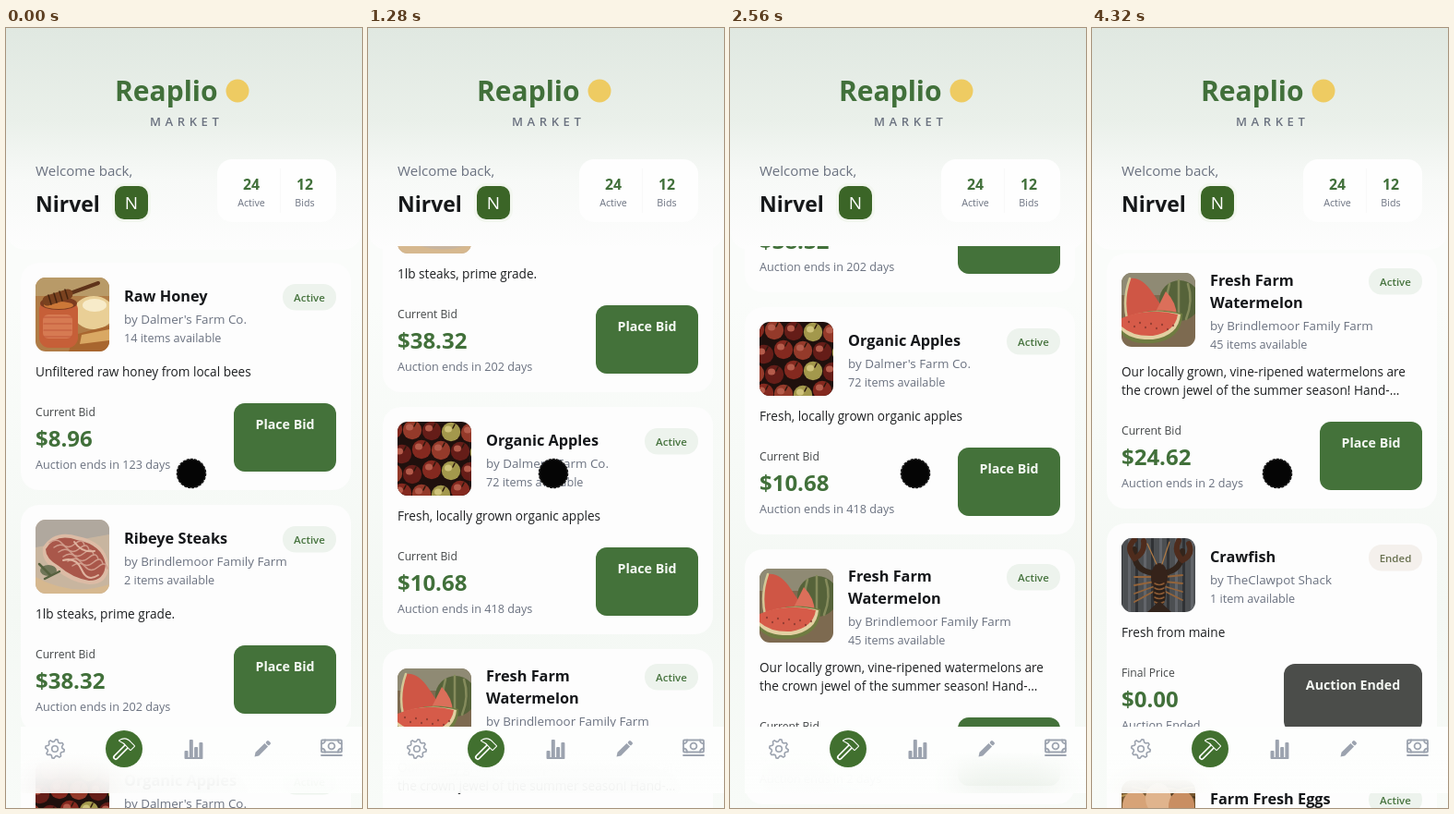
Write an HTML page that moves like this. It is 386 px wide and 844 px high and loops after 4.4 s.

```html
<!DOCTYPE html>
<html lang="en">
<head>
<meta charset="utf-8">
<title>Farm auction list</title>
<style>
  html, body { margin: 0; width: 100%; height: 100%; overflow: hidden; }
  body { position: relative; background: linear-gradient(#fafcfa 35%, #f4f8f4 75%, #f8fbf8); }
  svg { position: absolute; left: 0; top: 0; display: block; }
  text { font-family: "Open Sans", "Noto Sans", sans-serif; fill: #6b7280; }
  .mid { text-anchor: middle; }
  .brand { font-size: 30px; font-weight: 700; fill: #41703a; }
  .market { font-size: 13px; font-weight: 600; letter-spacing: 4.6px; }
  .hello { font-size: 15.1px; }
  .user { font-size: 23px; font-weight: 700; fill: #16181a; }
  .initial { font-size: 19px; fill: #fff; }
  .count { font-size: 15.8px; font-weight: 700; fill: #41703a; }
  .unit { font-size: 10.7px; }
  .title { font-size: 16.3px; font-weight: 700; fill: #15171a; }
  .seller { font-size: 13.4px; }
  .small { font-size: 12.65px; }
  .desc { font-size: 13.62px; fill: #1d1f21; }
  .label { font-size: 12.15px; fill: #454849; }
  .price { font-size: 24px; font-weight: 700; fill: #41703a; }
  .action { font-size: 14.2px; font-weight: 700; fill: #f4f8f3; }
  .badge { font-size: 11.5px; font-weight: 600; fill: #47743f; }
  .ended { fill: #68704f; }
  nav {
    position: absolute; left: 16px; top: 756px; width: 386px; height: 72px;
    background: linear-gradient(#fdfefd 38%, rgba(253, 254, 253, .88));
    backdrop-filter: blur(18px);
  }
</style>
</head>
<body>
<svg id="stage" width="386" height="844" viewBox="0 0 386 844"></svg>
<nav></nav>
<svg id="icons" width="386" height="844" viewBox="0 0 386 844"></svg>
<script>
const LOOP = 4400, STEP = 80, FIRST_TOP = 254, GAP = 16;
const GREEN = '#44723a', GREY = '#9ca3af';

const text = (x, y, str, cls) => `<text x="${x}" y="${y}" class="${cls}">${str}</text>`;
const rect = (x, y, w, h, r, fill, more = '') =>
  `<rect x="${x}" y="${y}" width="${w}" height="${h}" rx="${r}" fill="${fill}" ${more}/>`;
const circle = (x, y, r, fill, more = '') => `<circle cx="${x}" cy="${y}" r="${r}" fill="${fill}" ${more}/>`;
const oval = (x, y, rx, ry, fill) => `<ellipse cx="${x}" cy="${y}" rx="${rx}" ry="${ry}" fill="${fill}"/>`;
const shape = (d, fill) => `<path d="${d}" fill="${fill}"/>`;
const line = (d, color, w) =>
  `<path d="${d}" fill="none" stroke="${color}" stroke-width="${w}" stroke-linecap="round" stroke-linejoin="round"/>`;
const repeat = (n, draw) => Array.from({ length: n }, (_, i) => draw(i)).join('');

// Thumbnails, each 80 x 80
const photo = {
  honey: () => rect(0, 0, 80, 80, 0, '#b07c46') + shape('M0 0H80V20H0Z', '#b89a68') +
    oval(63, 38, 22, 18, '#e9cf96') + oval(64, 30, 13, 7, '#f7ebc9') +
    shape('M42 62L80 52V80H36Z', '#a8662f') + shape('M50 62L80 56V68L48 72Z', '#d9a863') +
    rect(4, 24, 42, 52, 11, '#c65f38') +
    oval(25, 28, 20, 7, '#7c3c20') + oval(25, 30, 16, 4, '#cc7838') +
    rect(8, 40, 32, 26, 6, '#d67a52') + repeat(4, i => line(`M9 ${43 + i * 7}H39`, '#c2583a', 1.2)) +
    line('M24 22L68 6', '#5f331a', 4) + line('M13 25L35 18', '#7a421f', 11) +
    repeat(4, i => line(`M${14 + i * 6} ${19 - i * 2}l3 10`, '#45240f', 1.5)),
  steak: () => rect(0, 0, 80, 80, 0, '#c8b59f') + shape('M0 0H80V16L0 30Z', '#b0a89e') +
    shape('M0 62Q40 84 80 70V80H0Z', '#d6b88f') +
    shape('M8 30Q20 10 46 18Q76 24 79 48Q80 70 58 70Q38 68 22 54Q6 46 8 30Z', '#dcbba5') +
    shape('M11 32Q22 14 45 22Q72 27 76 48Q75 66 58 66Q40 63 25 50Q11 42 11 32Z', '#a9574a') +
    repeat(6, i => line(`M${15 + i * 5} ${25 + i * 5}q8 -6 14 1t14 0t10 2`, '#d09c8b', 1.4)) +
    line('M42 24Q50 36 64 34M30 44Q44 40 50 54T68 60', '#dfb4a0', 2) +
    oval(14, 55, 9, 6, '#6f7558') + line('M4 48l12 12M10 64l16-8', '#56613f', 2.5),
  apples: () => rect(0, 0, 80, 80, 0, '#1f100d') + repeat(20, i => {
    const row = Math.floor(i / 5), x = (i % 5) * 21 - 5 + (row % 2) * 10, y = row * 22 + 8 + (i * 7 % 6);
    const pale = [3, 9, 13, 17].includes(i);
    return circle(x, y, 10.2, pale ? '#a3984c' : ['#84291f', '#943a2a', '#651d18'][i % 3]) +
      oval(x - 3, y - 3, 4, 3.5, pale ? '#cfc37b' : '#b55c4b') + line(`M${x + 2} ${y - 4}l2-4`, '#2c180e', 1.5);
  }),
  melon: () => rect(0, 0, 80, 80, 0, '#7d6a50') + rect(0, 0, 80, 24, 0, '#8f8a74') +
    circle(63, 30, 22, '#56633a') + line('M52 12Q46 30 54 50M62 8V52M72 12Q78 30 70 50', '#858b5c', 2.5) +
    shape('M9 6Q22 4 34 22L50 46L6 50Q2 26 9 6Z', '#cf5645') + line('M9 6Q1 28 6 50', '#d3c796', 2.5) +
    shape('M34 48L48 20Q60 32 60 48Z', '#db6f5a') +
    shape('M0 52Q30 34 66 44Q66 72 34 76Q10 78 0 66Z', '#6f7c41') +
    shape('M0 50Q30 36 64 45Q62 68 34 72Q10 73 0 62Z', '#e2d0a2') +
    shape('M0 49Q30 37 61 45Q58 64 34 68Q12 69 0 58Z', '#d65b49') +
    repeat(9, i => oval(8 + i * 6, 53 + (i * 5 % 9), .9, 1.3, '#8a3a30')),
  crawfish: () => rect(0, 0, 80, 80, 0, '#4c4f52') +
    repeat(5, i => rect(i * 17 - 2, 0, 3, 80, 0, '#303235') + rect(i * 17 + 7, 0, 3, 80, 0, '#62656a')) +
    line('M36 38Q12 36 14 12M44 38Q66 36 66 14', '#32241b', 6) +
    line('M14 22Q4 10 14 2M14 22Q26 16 24 3M66 24Q56 14 62 3M66 24Q78 18 73 6', '#4e2c1d', 6) +
    repeat(4, i => line(`M36 ${42 + i * 5}L14 ${42 + i * 9}M46 ${42 + i * 5}L66 ${40 + i * 9}`, '#94643a', 1.8)) +
    oval(41, 42, 9, 15, '#35231a') + oval(41, 61, 7, 13, '#2b201a') +
    repeat(5, i => line(`M36 ${49 + i * 5}q5 3 10 0`, '#8d5b34', 1.5)) +
    shape('M41 68L28 80H54Z', '#33241c') + line('M38 28L28 6M44 28L52 4', '#b07a44', 1.2),
  eggs: () => rect(0, 0, 80, 80, 0, '#755730') +
    repeat(16, i => line(`M${i * 6 - 6} ${i * 17 % 22}l22 ${(i % 5) * 5 - 10}`, i % 2 ? '#b99555' : '#4a351d', 2)) +
    repeat(6, i => oval(15 + (i % 3) * 25, 28 + Math.floor(i / 3) * 28 - (i % 3 === 1 ? 8 : 0), 14, 17, ['#d7a377', '#e0b48d', '#c98e62'][i % 3]))
};

const farmA = "Dalmer's Farm Co.", farmB = 'Brindlemoor Family Farm';
const items = [
  { pic: 'honey', title: ['Raw Honey'], seller: farmA, stock: '14 items', desc: ['Unfiltered raw honey from local bees'], price: '8.96', days: 123 },
  { pic: 'steak', title: ['Ribeye Steaks'], seller: farmB, stock: '2 items', desc: ['1lb steaks, prime grade.'], price: '38.32', days: 202 },
  { pic: 'apples', title: ['Organic Apples'], seller: farmA, stock: '72 items', desc: ['Fresh, locally grown organic apples'], price: '10.68', days: 418 },
  { pic: 'melon', title: ['Fresh Farm', 'Watermelon'], seller: farmB, stock: '45 items',
    desc: ['Our locally grown, vine-ripened watermelons are', 'the crown jewel of the summer season! Hand-…'], price: '24.62', days: 2 },
  { pic: 'crawfish', title: ['Crawfish'], seller: 'TheClawpot Shack', stock: '1 item', desc: ['Fresh from maine'], price: '0.00', ended: true },
  { pic: 'eggs', title: ['Farm Fresh Eggs'], seller: farmA, stock: '30 items', desc: ['Farm fresh eggs'], price: '5.00', days: 12 }
];

function card(item, top) {
  const tall = item.title.length > 1, { ended } = item;
  const pic = top + (tall ? 21 : 16);
  const head = pic + (tall ? 12 : 0);
  const foot = pic + (tall ? 25 : 0);
  const badge = pic + (tall ? -5 : 7);
  const left = ended ? 208 : 247;
  const height = tall ? 276 : 246;
  const svg = rect(16, top, 358, height, 20, '#fdfdfd') +
    `<g transform="translate(32 ${pic})" clip-path="url(#thumb)">${photo[item.pic]()}</g>` +
    item.title.map((s, i) => text(128, pic + (tall ? 14 : 26) + i * 24, s, 'title')).join('') +
    text(128, head + 50, 'by ' + item.seller, 'seller') +
    text(128, head + 70, item.stock + ' available', 'small') +
    rect(300, badge, 58, 28.5, 14, ended ? '#f4f0ec' : '#edf3ed') +
    text(329, badge + 18.5, ended ? 'Ended' : 'Active', 'badge mid' + (ended ? ' ended' : '')) +
    item.desc.map((s, i) => text(32, pic + (tall ? 112 : 107) + i * 20, s, 'desc')).join('') +
    text(32, foot + 150, ended ? 'Final Price' : 'Current Bid', 'label') +
    text(32, foot + 183, '$' + item.price, 'price') +
    text(32, foot + 207, ended ? 'Auction Ended' : `Auction ends in ${item.days} days`, 'small') +
    rect(left, foot + 136, 358 - left, 74, 12, ended ? '#4b4d4a' : GREEN) +
    text((left + 358) / 2, foot + 164, ended ? 'Auction Ended' : 'Place Bid', 'action mid');
  return { svg, height };
}

function cards() {
  let top = FIRST_TOP;
  return items.map(item => {
    const { svg, height } = card(item, top);
    top += height + GAP;
    return svg;
  }).join('');
}

const header = () =>
  `<path d="M0 0H386V216Q386 240 362 240H24Q0 240 0 216Z" fill="url(#fade)"/>` +
  text(118, 79, 'Reaplio', 'brand') + circle(251, 68, 12.5, '#eecb62') +
  text(156, 106, 'MARKET', 'market') +
  text(32, 160, 'Welcome back,', 'hello') + text(32, 199, 'Nirvel', 'user') +
  rect(115, 168, 42, 42, 13, '#f2f6ef') + rect(118, 171, 36, 36, 10, '#3b6527') +
  text(136, 196, 'N', 'initial mid') +
  rect(229, 142, 129, 68, 16, '#fefefe') + rect(297, 152, 1, 48, 0, '#f8f9f8') +
  text(266, 175, '24', 'count mid') + text(266, 193, 'Active', 'unit mid') +
  text(324, 175, '12', 'count mid') + text(324, 193, 'Bids', 'unit mid');

function gear() {
  const points = Array.from({ length: 32 }, (_, i) => {
    const a = (i + .5) * Math.PI / 16, r = i % 4 < 2 ? 10.3 : 7.9;
    return `${(r * Math.cos(a)).toFixed(2)} ${(r * Math.sin(a)).toFixed(2)}`;
  });
  return line(`M${points.join('L')}Z`, GREY, 1.6) + circle(0, 0, 3.3, 'none', `stroke="${GREY}" stroke-width="1.6"`);
}

function hammer() {
  const head = 'M-5 -9Q2 -13 7 -7L11 -3L7 1L3 -3Q0 -7 -5 -9Z';
  return circle(0, 0, 20, '#41702f') +
    line('M-9 9L3 -3', '#fff', 6) + line('M-9 9L3 -3', '#41702f', 2.6) +
    line(head, '#fff', 2) + shape(head, '#41702f');
}

const bars = () => [8, 20, 12, 17].map((h, i) => rect(-9.5 + i * 5.3, 10 - h, 4, h, 1, GREY)).join('') +
  rect(-9.5, 9, 20, 2, 1, GREY);

const pencil = () => `<g transform="rotate(45)">` + rect(-2.6, -11, 5.2, 4, 1.5, GREY) +
  shape('M-2.6 -6H2.6V8L0 12L-2.6 8Z', GREY) + '</g>';

const banknote = () => `<g fill="none" stroke="${GREY}" stroke-width="1.8" stroke-linecap="round">` +
  rect(-11, -9.5, 22, 13, 1, 'none') + circle(0, -3, 3.4, 'none') +
  '<path d="M-11 -5.5Q-7 -6 -7 -9.5M11 -5.5Q7 -6 7 -9.5M-11 -.5Q-7 0 -7 3.5M11 -.5Q7 0 7 3.5M-11 7H11"/></g>';

document.getElementById('stage').innerHTML = `<defs>
  <linearGradient id="fade" x1="0" y1="0" x2="0" y2="1">
    <stop offset="0" stop-color="#e0e8e1"/><stop offset=".42" stop-color="#eaf0ea"/>
    <stop offset=".68" stop-color="#f7f9f7"/><stop offset="1" stop-color="#fdfdfd"/>
  </linearGradient>
  <clipPath id="thumb"><rect width="80" height="80" rx="11"/></clipPath>
  <clipPath id="view"><rect y="236" width="386" height="608"/></clipPath>
  </defs>${header()}<g clip-path="url(#view)"><g id="list">${cards()}</g></g>` +
  circle(201, 482, 15.5, '#050505', 'stroke="#1c1c1c" stroke-width="1.6" stroke-dasharray="3 1.2"');

document.getElementById('icons').innerHTML = [gear, hammer, bars, pencil, banknote]
  .map((icon, i) => `<g transform="translate(${53 + i * 75} 780)">${icon()}</g>`).join('');

// Two flicks, each slowing exponentially, joined by a soft maximum
function scrollAt(t) {
  const first = 520 * (1 - Math.exp(-t / 1040));
  const second = 800 - 104 * Math.exp((3120 - t) / 367);
  return Math.max(first, second) + 12 * Math.log1p(Math.exp(-Math.abs(first - second) / 12));
}

const list = document.getElementById('list');
function render() {
  const t = Math.floor(performance.now() % LOOP / STEP) * STEP;
  list.setAttribute('transform', `translate(0 ${-Math.round(scrollAt(t))})`);
  requestAnimationFrame(render);
}
render();
</script>
</body>
</html>
```
